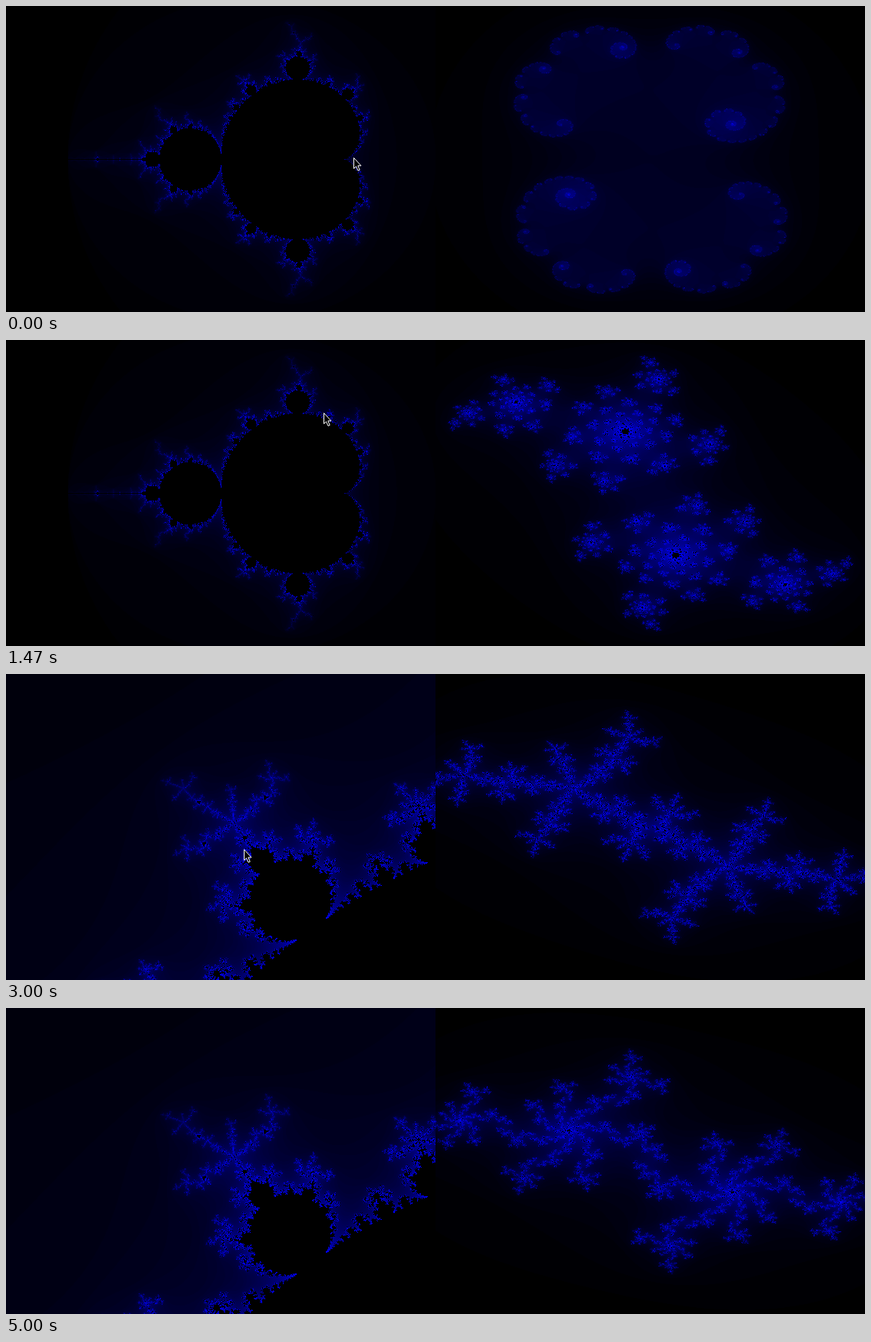
Recreate the animation shown at these times as an HTML page with a canvas. Size 1120 px wide and 400 px high, loop 5.59 s.

```html
<!DOCTYPE html>
<html>
<head>
<meta charset="utf-8">
<style>
html, body { margin: 0; width: 100%; height: 100%; overflow: hidden; background: #000; }
canvas { display: block; }
</style>
</head>
<body>
<canvas id="stage" width="1120" height="400"></canvas>
<script>
const W = 560, H = 400, LOOP = 5590, STEP = 66.71, LAST = 74;
const MAX_ITER = 64, SHADE = 256 / MAX_ITER, JULIA_SPAN = 2.5;
const ctx = document.getElementById('stage').getContext('2d');
const left = ctx.createImageData(W, H), right = ctx.createImageData(W, H);
const arrow = new Path2D('M.5 .5v14l3-2.8 2.5 5.6 2.2-1-2.4-5.5H10z');

// Pointer waypoints (step, x, y) and the steps at which it clicks
const path = [
  [0, 453, 198], [8, 470, 145], [21, 414, 95], [27, 359, 92], [30, 308, 98], [37, 350, 163],
  [40, 280, 200], [45, 318, 236], [53, 315, 241], [62, 417, 194], [73, 196, 388]
];
const clicks = [30, 40, 40];

function pointer(step) {
  const s = Math.min(step, LAST - 1);
  const i = Math.max(1, path.findIndex(p => p[0] >= s));
  const [s0, x0, y0] = path[i - 1], [s1, x1, y1] = path[i];
  const u = (s - s0) / (s1 - s0);
  return [Math.round(x0 + (x1 - x0) * u), Math.round(y0 + (y1 - y0) * u)];
}

const toPlane = (v, x, y) => [v.re + (x - W / 2) / v.scale, v.im + (y - H / 2) / v.scale];

// Each earlier click centres the view on the pointer and doubles the scale
function viewAt(step) {
  const view = { re: -0.75, im: 0, scale: 160 };
  for (const click of clicks.filter(c => c < step)) {
    [view.re, view.im] = toPlane(view, ...pointer(click));
    view.scale *= 2;
  }
  return view;
}

function blue(x, y, cx, cy) {
  for (let n = 0; n < MAX_ITER; n++) {
    const re = x * x - y * y + cx;
    y = 2 * x * y + cy;
    x = re;
    if (x * x + y * y > 4) return n * SHADE;
  }
  return 0;
}

function render(img, shade) {
  const d = img.data;
  for (let y = 0, i = 0; y < H; y++) {
    for (let x = 0; x < W; x++, i += 4) {
      d[i + 2] = shade(x, y);
      d[i + 3] = 255;
    }
  }
}

function drawPointer(x, y) {
  ctx.save();
  ctx.translate(x, y);
  ctx.fillStyle = '#000';
  ctx.strokeStyle = '#fff';
  ctx.fill(arrow);
  ctx.stroke(arrow);
  ctx.restore();
}

let shownStep = -1, shownScale = 0;

function draw(step) {
  const view = viewAt(step);
  if (view.scale !== shownScale) {
    render(left, (x, y) => blue(0, 0, ...toPlane(view, x, y)));
    shownScale = view.scale;
  }
  const [px, py] = pointer(step);
  const [cx, cy] = toPlane(view, px, py);
  render(right, (x, y) => blue((x / W - 0.5) * JULIA_SPAN, (y / H - 0.5) * JULIA_SPAN, cx, cy));

  ctx.putImageData(left, 0, 0);
  ctx.putImageData(right, W, 0);
  if (step < LAST) drawPointer(px, py);
}

function tick() {
  const t = performance.now() % LOOP;
  const step = t < 126 ? 0 : Math.min(LAST, 1 + Math.floor((t - 126) / STEP));
  if (step !== shownStep) {
    draw(step);
    shownStep = step;
  }
  requestAnimationFrame(tick);
}
tick();
</script>
</body>
</html>
```
